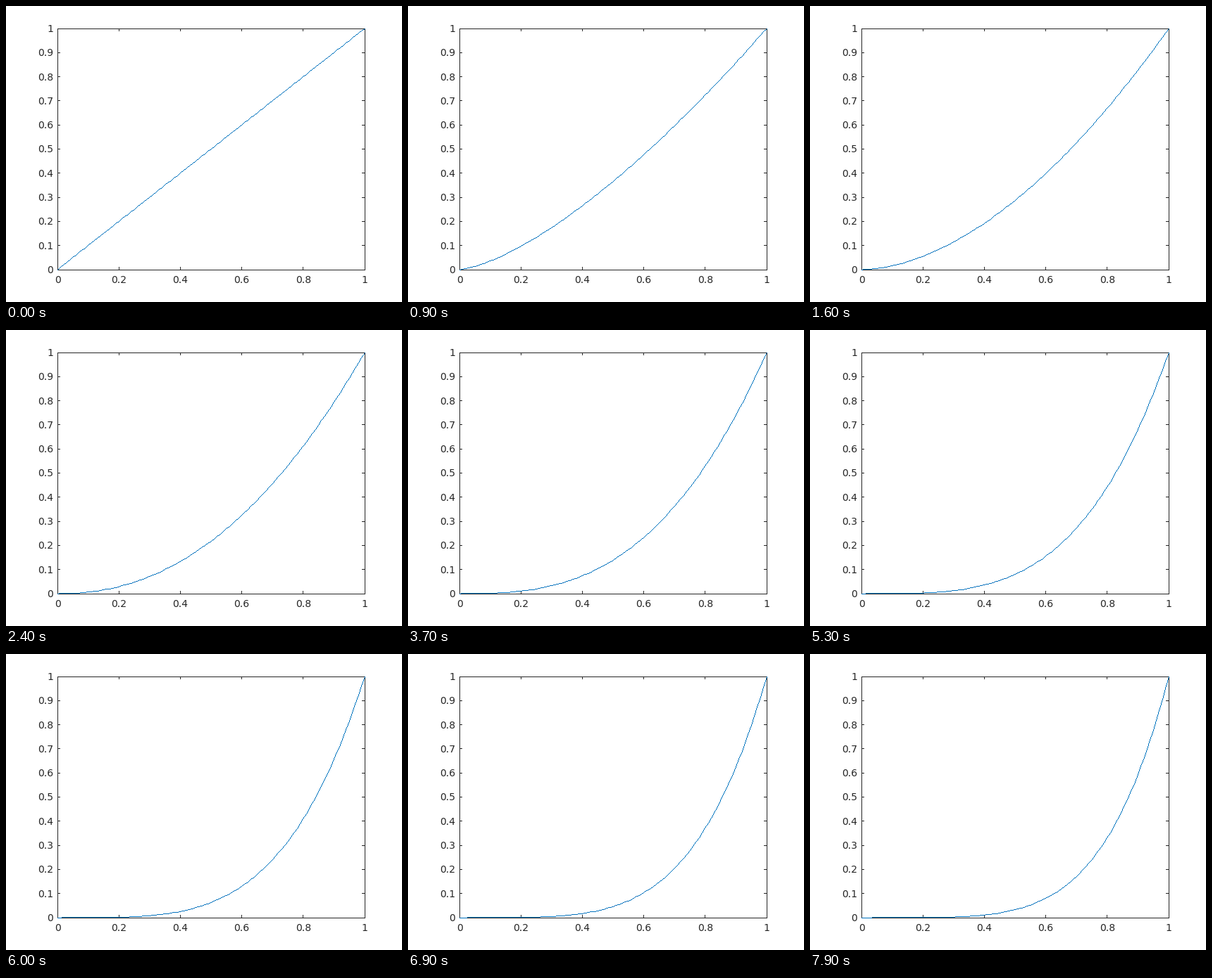
Write a matplotlib script that moves like this. It is 562 px wide and 421 px high and loops after 8 s.

```python
import numpy as np
import matplotlib.pyplot as plt
from matplotlib.animation import FuncAnimation
from matplotlib.collections import PolyCollection

W, H, DPI = 562, 421, 64
LEFT, RIGHT, TOP, BOTTOM = 73, 509, 32, 375
TICK = 5
INK, BLUE = "#262626", "#0072bd"
FRAMES = 80
STEP = 0.05
TINY = 6e-8  # smaller values count as zero

xs = np.linspace(0, 1, 101)


def to_col(x):
    return LEFT + (RIGHT - LEFT) * x


def to_row(y):
    return BOTTOM - (BOTTOM - TOP) * y


def snap(v):
    return np.floor(v).astype(int)


def rect(x, y, w=1, h=1):
    return [(x, y), (x + w, y), (x + w, y + h), (x, y + h)]


def segment(c0, r0, c1, r1):
    """Pixels of a one-pixel-wide line that rises to the right."""
    dc, dr = c1 - c0, r0 - r1
    n = max(dc, dr)
    for i in range(n + 1):
        yield (c0 + (2 * i * dc + n) // (2 * n),
               r0 - (2 * i * dr + n) // (2 * n))


def curve_cells(power):
    """Unit squares along y = x ** power, with its vertices on whole pixels."""
    ys = xs ** power
    ys[ys < TINY] = 0
    cols, rows = snap(to_col(xs)).tolist(), snap(to_row(ys)).tolist()
    pieces = zip(cols, rows, cols[1:], rows[1:])
    return [rect(c, r) for p in pieces for c, r in segment(*p)]


def label(value, x, y, ha):
    ax.text(x, y, f"{value:g}", ha=ha, va="baseline", color=INK,
            family="DejaVu Sans", fontsize=14 * 72 / DPI)


fig = plt.figure(figsize=(W / DPI, H / DPI), dpi=DPI, facecolor="white")
ax = fig.add_axes([0, 0, 1, 1])
ax.set(xlim=(0, W), ylim=(H, 0))
ax.axis("off")

width, height = RIGHT - LEFT + 1, BOTTOM - TOP + 1
lines = [rect(LEFT, TOP, width, 1), rect(LEFT, BOTTOM, width, 1),
         rect(LEFT, TOP, 1, height), rect(RIGHT, TOP, 1, height)]

for v in np.arange(6) / 5:
    c = snap(to_col(v))
    lines += [rect(c, TOP, 1, TICK - 1), rect(c, BOTTOM - TICK + 1, 1, TICK)]
    label(v, to_col(v), 394, "center")

for v in np.arange(11) / 10:
    r = snap(to_row(v))
    lines += [rect(LEFT, r, TICK - 1, 1), rect(RIGHT - TICK + 1, r, TICK, 1)]
    label(v, 67, to_row(v) + 5, "right")

style = dict(linewidths=0, edgecolors="none", antialiaseds=False)
ax.add_collection(PolyCollection(lines, facecolors=INK, zorder=1, **style),
                  autolim=False)
curve = PolyCollection(curve_cells(1), facecolors=BLUE, zorder=2, **style)
ax.add_collection(curve, autolim=False)


def update(i):
    curve.set_verts(curve_cells(1 + STEP * i))
    return [curve]


anim = FuncAnimation(fig, update, frames=FRAMES, interval=100,
                     repeat=True, repeat_delay=0, blit=False)
plt.show()
```
